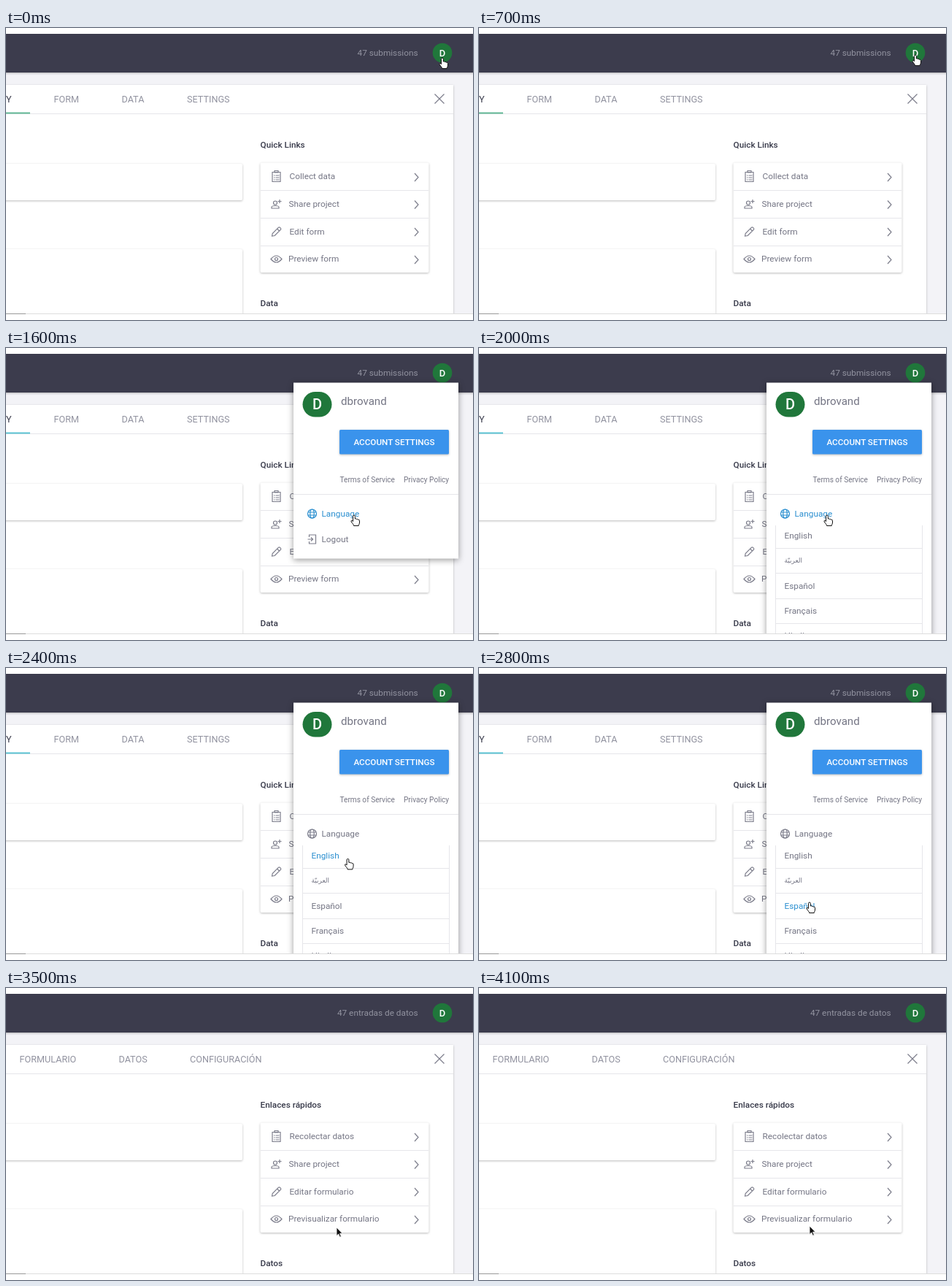
An HTML page that plays this animation: 640x400 px, repeating every 4.2 s.

```html
<!DOCTYPE html>
<html lang="en">
<head>
<meta charset="utf-8">
<title>Switching language</title>
<style>
  html, body { margin: 0; width: 100%; height: 100%; overflow: hidden; background: #fff; }
  svg { display: block; }
  text { font: 11.8px Roboto, sans-serif; fill: #747584; }
  .tab { font-size: 12.65px; fill: #9293a0; }
  .head { font-weight: 500; fill: #383a4a; }
  .count { fill: #9293a0; text-anchor: end; }
  .small { font-size: 10.1px; }
  .line { fill: none; stroke: #e6e6ea; }
  .icon { fill: none; stroke: #7c7d8b; stroke-width: 1.2; }
  .card { fill: #fff; filter: drop-shadow(0 1px 1.5px #0004); }
  .badge { fill: #20773b; }
  .initial { fill: #fff; font-weight: 500; text-anchor: middle; }
  .hover text { fill: #2b8fd0; }
  .hover .icon { stroke: #2b8fd0; }
</style>
</head>
<body>
<svg width="640" height="400" viewBox="0 0 640 400">
  <defs>
    <clipPath id="screen"><path d="M0 8H640V391H0Z"/></clipPath>
  </defs>
  <g clip-path="url(#screen)">
    <rect width="640" height="400" fill="#f3f3f7"/>
    <rect class="card" x="-10" y="78" width="623" height="340"/>
    <rect class="card" x="-10" y="-5" width="660" height="66" style="fill:#3c3c4d"/>
    <path class="line" d="M0 117.5H613"/>
    <rect class="card" x="-10" y="186" width="334" height="50" rx="2"/>
    <rect class="card" x="-10" y="303" width="334" height="110" rx="2"/>
    <rect class="card" x="348.5" y="184.5" width="231" height="150.5" rx="2"/>
    <path class="line" d="M349 222.5H579M349 260.5H579M349 298.5H579"/>
    <path class="icon" stroke-width="1.4" d="M587.500 90.500l13 13m0-13l-13 13M560 199l5 5.500-5 5.500M560 236.500l5 5.500-5 5.500M560 274l5 5.500-5 5.500M560 312l5 5.500-5 5.500"/>
    <g class="icon">
      <path d="M365 197.500h11v13h-11zM368 198v-2.500h5v2.500zM367 202h1.500m1 0h5M367 205h1.500m1 0h5M367 208h1.500m1 0h5"/>
      <circle cx="369" cy="239.500" r="2.500"/>
      <path d="M364 247v-1.500q0-2 5-2t5 2v1.500zM375 235v5m-2.500-2.500h5"/>
      <path d="M364.500 285l.7-3.500 8.300-8.300q1-.8 2 .2l.8.8q1 1 .2 2l-8.300 8.300zM371.500 275l3 3"/>
      <path d="M363 316.500q7.500-9 15 0q-7.500 9-15 0z"/>
      <circle cx="370.500" cy="316.500" r="2"/>
    </g>
    <circle class="badge" cx="598" cy="34" r="13.300"/>
    <text class="initial" x="598" y="38.500" style="font-size:13px">D</text>

    <g id="english">
      <text class="count" x="564.500" y="37.500">47 submissions</text>
      <text class="tab" x="7.500" y="101.500" text-anchor="end" style="fill:#383a4a">SUMMARY</text>
      <path id="underline" d="M0 116.500H33" stroke-width="2"/>
      <text class="tab" x="65.500" y="101.500">FORM</text>
      <text class="tab" x="158.500" y="101.500">DATA</text>
      <text class="tab" x="248" y="101.500">SETTINGS</text>
      <text class="head" x="348.500" y="164">Quick Links</text>
      <text x="388.500" y="207">Collect data</text>
      <text x="387.500" y="244.500">Share project</text>
      <text x="388.500" y="282.500">Edit form</text>
      <text x="387" y="320">Preview form</text>
      <text class="head" x="348.500" y="381">Data</text>
    </g>

    <g id="spanish">
      <text class="count" x="564.500" y="37.500">47 entradas de datos</text>
      <text class="tab" x="18.500" y="101.500">FORMULARIO</text>
      <text class="tab" x="154.500" y="101.500">DATOS</text>
      <text class="tab" x="252" y="101.500">CONFIGURACIÓN</text>
      <text class="head" x="348.500" y="164">Enlaces rápidos</text>
      <text x="388.500" y="207">Recolectar datos</text>
      <text x="387.500" y="244.500">Share project</text>
      <text x="388.500" y="282.500">Editar formulario</text>
      <text x="387" y="320">Previsualizar formulario</text>
      <text class="head" x="348.500" y="381">Datos</text>
    </g>

    <g id="menu">
      <rect id="panel" x="394" y="47.500" width="226" height="241" fill="#fff" style="filter:drop-shadow(0 2px 4px #0006)"/>
      <rect class="badge" x="406.500" y="60" width="40" height="34.500" rx="17.250"/>
      <text class="initial" x="426.500" y="83.500" style="font-size:20px">D</text>
      <text x="459" y="78" style="font-size:15.1px">dbrovand</text>
      <rect class="card" x="457" y="112" width="150" height="33.500" rx="1.500" style="fill:#3a93ec"/>
      <text class="initial" x="532" y="133" style="font-size:11.7px">ACCOUNT SETTINGS</text>
      <text class="small" x="457.500" y="183.500">Terms of Service</text>
      <text class="small" x="545" y="183.500">Privacy Policy</text>
      <path class="line" d="M394 200.500H620"/>
      <g class="row" data-y="228">
        <g class="icon" stroke-width="1">
          <circle cx="419.500" cy="227" r="6"/>
          <ellipse cx="419.500" cy="227" rx="2.700" ry="6"/>
          <path d="M414 225h11m-11 4h11"/>
        </g>
        <text x="432.500" y="230.500">Language</text>
      </g>
      <g id="logout">
        <path class="icon" d="M415.500 259v-3h9v12h-9v-3M413.500 262h7m-2.500-2.500l2.500 2.500-2.500 2.500"/>
        <text x="432.500" y="265.500">Logout</text>
      </g>
      <g id="list">
        <path class="line" d="M406.500 243V391M607.500 243V391M406 274.500H607M406 308.500H607M406 343.500H607M406 377.500H607"/>
        <g class="row" data-y="257"><text x="418.500" y="261">English</text></g>
        <g class="row" data-y="291"><text x="418.500" y="294" style="font-size:9px">العربيّة</text></g>
        <g class="row" data-y="326"><text x="418.500" y="330">Español</text></g>
        <g class="row" data-y="360"><text x="418.500" y="364">Français</text></g>
        <text x="418.500" y="398">Hindi</text>
      </g>
    </g>

    <g id="cursor">
      <path id="hand" fill="#fff" stroke="#111" d="M-1.500 1.500Q-1.500 0 0 0Q1.300 0 1.300 1.500V5q1.800-.7 2.200.6q1.600-.6 2.100.6q1.900-.4 1.900 1.200V10q0 2-1.200 3.500v1H-.5v-1Q-2 11.500-4 8.800Q-4.300 7.200-2.800 7.400L-1.500 8.600Z"/>
      <path id="arrow" fill="#111" stroke="#fff" stroke-width=".8" d="M0 0V11.500L2.700 9 4.500 13.200 6.400 12.400 4.600 8.300H8Z"/>
    </g>
  </g>
  <path d="M0 391.500H27" stroke="#999"/>
  <path d="M27 391.500H640" stroke="#ddd"/>
</svg>
<script>
const LOOP = 4200, STEP = 100;
const MENU_OPENS = 900, LIST_OPENS = 1900, LANGUAGE_CHANGES = 3500;

// Cursor path: time, x, y
const path = [
  [0, 598, 41], [600, 598, 41], [700, 598, 37], [900, 598, 37],
  [1200, 473, 209], [1600, 477, 229], [2200, 477, 229],
  [2700, 453, 321], [2900, 453, 321], [3100, 453, 328],
  [3500, 453, 328], [3700, 453, 326], [LOOP, 453, 326]
];
const $ = id => document.getElementById(id);
const show = (id, on) => { $(id).style.display = on ? '' : 'none'; };
const rows = [...document.querySelectorAll('.row')];

function cursorAt(t) {
  const i = path.findIndex(p => p[0] > t);
  const [t0, x0, y0] = path[i - 1], [t1, x1, y1] = path[i];
  const k = (t - t0) / (t1 - t0), e = k * k * (3 - 2 * k);
  return [x0 + (x1 - x0) * e, y0 + (y1 - y0) * e];
}

function draw(t) {
  const spanish = t >= LANGUAGE_CHANGES;
  const menu = t >= MENU_OPENS && !spanish;
  const list = menu && t >= LIST_OPENS;
  const [x, y] = cursorAt(t);

  show('english', !spanish);
  show('spanish', spanish);
  show('menu', menu);
  show('list', list);
  show('logout', !list);
  $('panel').setAttribute('height', list ? 360 : 241);
  $('underline').setAttribute('stroke', menu ? '#5cc3d3' : '#62b895');

  let hand = t <= MENU_OPENS;
  for (const row of rows) {
    const reach = row === rows[0] ? 12 : 17;
    const over = menu && x < 540 && Math.abs(y - row.dataset.y) < reach;
    row.classList.toggle('hover', over);
    hand ||= over;
  }
  show('hand', hand);
  show('arrow', !hand);
  $('cursor').setAttribute('transform', `translate(${x} ${y})`);
}

function tick() {
  draw(Math.floor(performance.now() % LOOP / STEP) * STEP);
  requestAnimationFrame(tick);
}
tick();
</script>
</body>
</html>
```
